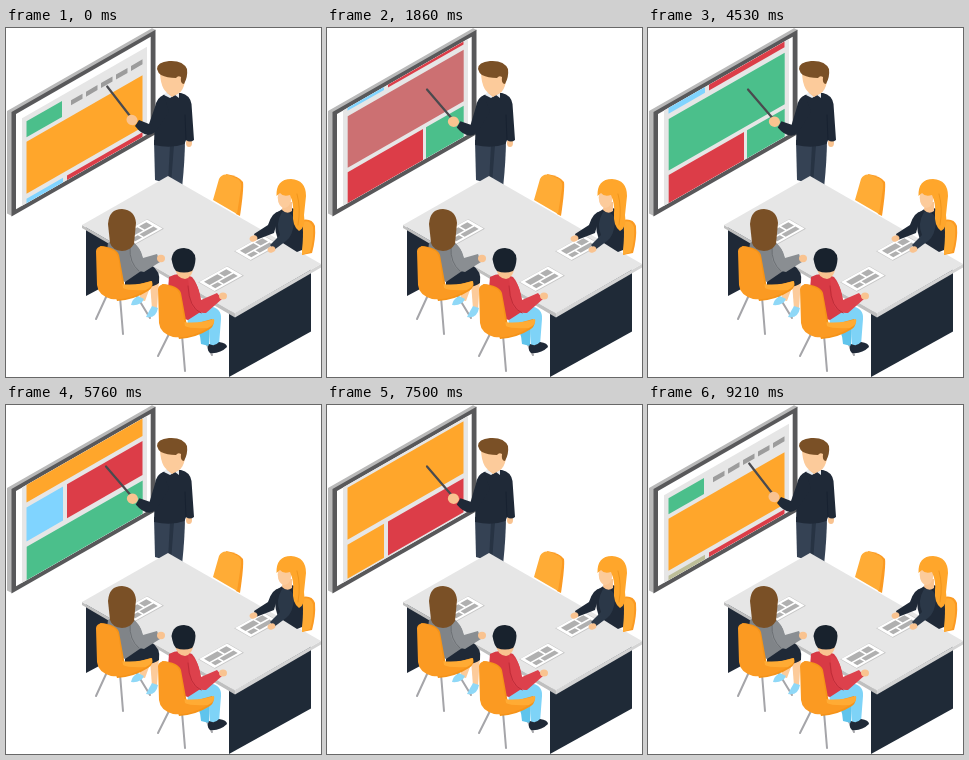
Recreate the animation shown at these times as an HTML page with a canvas. Size 315 by 349 pixels, loop 9.24 s.

```html
<!DOCTYPE html>
<html lang="en">
<head>
<meta charset="utf-8">
<title>Team presentation</title>
<style>
  html, body { margin: 0; width: 100%; height: 100%; overflow: hidden; background: #fff; }
  canvas { display: block; width: 315px; height: 349px; }
</style>
</head>
<body>
<canvas id="stage"></canvas>
<script>
const W = 315, H = 349, LOOP = 9240, SLOPE = 0.572;
const ORANGE = [255, 166, 43], BLUE = [128, 212, 255], CORAL = [240, 81, 84],
      GREEN = [75, 191, 139], GRAY = [155, 155, 155], RED = [220, 61, 72];
const NAVY = '#1f2937', SKIN = '#fccb9b', HAND = '#f9c390', HAIR = '#7a5026';
const CHAIR = '#fb9a22', CHAIR_LIGHT = '#ffab34', CHAIR_DARK = '#f59318';

const canvas = document.getElementById('stage');
const dpr = window.devicePixelRatio || 1;
canvas.width = W * dpr;
canvas.height = H * dpr;
const ctx = canvas.getContext('2d');

const rgb = c => `rgb(${c.map(Math.round)})`;
const mix = (a, b, k) => a.map((v, i) => v + (b[i] - v) * k);
const ramp = (t, a, b) => Math.min(1, Math.max(0, (t - a) / (b - a)));
const ease = k => (1 - Math.cos(Math.PI * k)) / 2;

function fill(color, d) {
  ctx.fillStyle = color;
  ctx.fill(new Path2D(d));
}

function line(color, width, d) {
  ctx.strokeStyle = color;
  ctx.lineWidth = width;
  ctx.stroke(new Path2D(d));
}

function oval(color, x, y, rx, ry, turn = 0) {
  ctx.fillStyle = color;
  ctx.beginPath();
  ctx.ellipse(x, y, rx, ry, turn, 0, Math.PI * 2);
  ctx.fill();
}

function block(color, x0, x1, y0, y1) {
  ctx.fillStyle = color;
  ctx.fillRect(x0, y0, x1 - x0, y1 - y0);
}

function scrollAt(t) {
  return 135 * ease(ramp(t, 0, 2330))
       - 104 * ease(ramp(t, 3590, 7260))
       - 31 * ease(ramp(t, 7480, 9200));
}

function drawPage(t) {
  const big = mix(mix(GRAY, CORAL, ramp(t, 1400, 2200)), GREEN, ramp(t, 2900, 3600));
  const small = mix(mix(BLUE, ORANGE, ramp(t, 6500, 7200)), BLUE, ramp(t, 9180, 9240));
  block('#e6e6e6', 16, 141, 88, 303);
  block(rgb(GREEN), 20.5, 56, 93.5, 109.5);
  for (let i = 0; i < 5; i++) block('#9c9c9c', 65 + i * 15, 76.5 + i * 15, 98, 103);
  block(rgb(ORANGE), 20.5, 136.5, 114, 166);
  block(rgb(small), 20.5, 57, 171, 205);
  block(rgb(RED), 61, 136.5, 171, 205);
  block(rgb(big), 20.7, 136.7, 210.5, 262);
  block(rgb(RED), 20.7, 96, 266.5, 299);
  block(rgb(GREEN), 99, 136.7, 266.5, 299);
}

function drawBoard(t) {
  fill('#b9b9b9', 'M1 83 L146 .3 L150 2 L6 86 V188 L1 185.5Z');
  ctx.save();
  // y is measured along the left edge of the page, x = 20
  ctx.transform(1, -SLOPE, 0, 1, 0, SLOPE * 20);
  block('#58585a', 5.5, 149.5, 75.8, 180.3);
  block('#fff', 10, 144.7, 80.2, 175.5);
  ctx.beginPath();
  ctx.rect(16, 80.2, 125, 95.3);
  ctx.clip();
  ctx.translate(0, -scrollAt(t));
  drawPage(t);
  ctx.restore();
}

function drawSpeaker(t) {
  fill('#354254', 'M148 112 L179 110 Q179 132 176 160 L149 152Z');
  fill('#273343', 'M164 117 L168 117 L165 156 L162 155Z');
  oval(HAND, 183, 115, 3, 4);
  fill(NAVY, 'M157 67 Q165 64 175 65 Q184 67 185.5 76 L188 112 Q184 115 180 112 L178.5 116 Q165 121 148 117 L149 84Z');
  line('#172130', 1, 'M179 87 L180 112');
  fill('#e8ecf0', 'M158 67 L161 63 L173 64 L173 70 L169 67 L164 70Z');
  fill(HAND, 'M160 57 H173 V65 L166 69 L161 65Z');
  fill(SKIN, 'M154 45 Q167 42 179 46 Q180 66 167 67 Q155 66 154 45Z');
  fill(HAIR, 'M151 41 Q151 34 163 33 Q177 32 181 41 Q182 49 178 56 Q174 56 175 49 Q172 47 170 50 Q161 50 155 47 Q152 45 151 41Z');

  ctx.save();
  ctx.translate(160, 84);
  ctx.rotate(-0.05 * (ease(ramp(t, 0, 1500)) - ease(ramp(t, 7400, LOOP))));
  ctx.translate(-160, -84);
  line('#4a4a4e', 2.2, 'M101.2 58.5 L124 88');
  fill(NAVY, 'M158 67 Q151 69 149 79 L143 96 L133 92 L129 98 Q135 106 142 107 Q149 106 152 100 L163 84Z');
  oval(HAND, 126, 92, 5.6, 5.2, 0.4);
  ctx.restore();
}

// flat sheet lying on the table, given by its left corner
function paper(x, y) {
  ctx.save();
  ctx.transform(28, -15.5, 15.5, 9, x, y);
  block('#c6c6c6', -0.02, 1.02, -0.02, 1.06);
  block('#fff', 0, 1, 0, 1);
  block('#b0b0b0', 0.1, 0.58, 0.14, 0.5);
  block('#b0b0b0', 0.64, 0.9, 0.14, 0.5);
  block('#b0b0b0', 0.1, 0.34, 0.6, 0.87);
  block('#b0b0b0', 0.4, 0.9, 0.6, 0.87);
  ctx.restore();
}

function drawTable() {
  fill(NAVY, 'M80 199 L127 225 V243 L80 268Z');
  fill('#1f2a37', 'M223 284 L305 239 V303.5 L223 349Z');
  fill('#bfbfbf', 'M76 197 L229 285 V289.5 L76 200Z');
  fill('#d4d4d4', 'M229 285 L315 236 V239.5 L229 289.5Z');
  fill('#e6e6e6', 'M76 197 L162 148 L315 236 L229 285.5Z');
  paper(113, 207);
  paper(229, 223);
  paper(193, 254);
}

function drawBackChair() {
  fill(CHAIR, 'M220 146 Q233 148 237 154 Q238 161 234 188 L230 186Z');
  fill('#ffac36', 'M213 151 Q216 145 223 147 L232 151 Q236 154 235 160 L231 186 L207 172Z');
}

function drawRightWoman() {
  fill(CHAIR, 'M296 192 Q306 190 309 198 Q310 211 306 225 L296 227Z');
  fill(CHAIR_LIGHT, 'M296 194 Q304 191 307 199 Q308 212 304 224 L296 227Z');
  fill(NAVY, 'M274 183 Q266 184 262 197 L248 206 L250 212 L268 205Z');
  oval(HAND, 247.5, 210.5, 4, 3, -0.4);
  fill(NAVY, 'M272 184 Q281 176 293 183 Q299 195 296 222 L291 224 L272 212 Q266 195 272 184Z');
  fill('#2b3848', 'M276 184 Q288 183 288 194 Q287 208 280 213 L268 222 L264 217 L274 207 Q269 196 276 184Z');
  oval(HAND, 265.5, 221.5, 4, 3, -0.4);
  fill(HAND, 'M277 174 H286 V183 Q281 187 276 182Z');
  oval(SKIN, 278.5, 169.5, 6.8, 10.5);
  fill('#ffa62b', 'M270.5 168 Q270 151 285 151 Q300 152 300 168 L298 187 Q300 199 293 203 Q286 198 287 185 Q288 176 284 167 Q277 169 274 165Z');
  line('#f0951c', 1, 'M291 166 Q295 180 292 197');
}

function drawLeftWoman() {
  line('#a5a5a9', 2, 'M101 267 L90 291 M114 269 L117 306 M130 267 L144 290');
  fill(SKIN, 'M136 257 L146 254 L139 273 L133 272Z');
  fill(SKIN, 'M144 255 L153 252 L151 281 L146 281Z');
  fill('#8fd8f7', 'M132 268 L138 271 Q135 278 125 277 Q126 271 132 268Z');
  fill('#8fd8f7', 'M146 278 L152 280 Q150 291 140 289 Q143 283 146 278Z');
  fill(NAVY, 'M119 245 L145 237 Q155 243 153 255 Q145 261 119 261Z');
  fill('#808488', 'M102 215 Q112 209 127 214 Q137 221 138 241 L119 254 L98 245Z');
  fill('#8a8e92', 'M125 215 Q134 217 137 230 L151 226 L154 234 L138 244 Q127 243 124 231Z');
  line('#6c7074', 1, 'M124 219 Q123 235 133 243');
  oval(HAND, 155, 230.5, 4, 3.7);
  fill(HAIR, 'M102 196 Q103 181 116 181 Q129 182 130 195 L128 216 Q124 223 116 223 Q106 222 104 215Z');
  fill(CHAIR_DARK, 'M94 218 Q110 219 113 227 L119 260 L145 253 Q149 258 142 263 Q128 272 111 273Z');
  fill(CHAIR_LIGHT, 'M115 256 Q130 258 146 253 Q148 258 140 262 Q128 267 114 266Z');
  fill(CHAIR, 'M90 223 Q91 217 99 219 L108 223 Q112 226 113 233 L117 260 Q122 263 140 262 Q122 273 105 271 Q92 267 91 257Z');
}

function drawBoy() {
  line('#a5a5a9', 2, 'M164 304 L152 328 M176 307 L179 343 M195 304 L206 327');
  fill('#5fc4ec', 'M186 285 L205 280 L203 318 L195 316 Q194 300 186 296Z');
  fill('#7ed3f7', 'M181 284 L203 278 Q216 280 215 291 L213 317 L204 317 L203 298 L182 298Z');
  fill(NAVY, 'M203 316 Q209 319 213 314 Q221 315 221 319 Q214 326 204 325 Q200 322 203 316Z');
  fill('#d83a45', 'M163 249 Q173 243 186 249 Q194 258 196 283 L182 292 L160 286Z');
  fill('#dd414c', 'M182 250 Q192 252 195 272 L211 265 L216 271 L200 285 Q189 286 185 276Z');
  line('#bf2c38', 1, 'M182 258 Q183 280 195 285');
  oval(HAND, 217, 268, 4, 3.6);
  fill(HAND, 'M169 239 H187 Q187 249 179 251 Q170 250 169 239Z');
  fill('#18222d', 'M165.5 231 Q167 220 178 220 Q189 221 189.5 231 Q189 239 186 243 Q178 246 170 243 Q167 240 165.5 231Z');
  fill(CHAIR_DARK, 'M156 256 Q172 257 175 265 L181 298 L206 291 Q210 296 204 301 Q190 310 173 311Z');
  fill(CHAIR_LIGHT, 'M177 294 Q192 296 208 291 Q210 296 202 300 Q190 305 176 304Z');
  fill(CHAIR, 'M152 261 Q153 255 161 257 L170 261 Q174 264 175 271 L179 298 Q184 301 202 300 Q184 311 167 309 Q154 305 153 295Z');
}

function draw(t) {
  ctx.setTransform(dpr, 0, 0, dpr, 0, 0);
  ctx.lineCap = 'round';
  block('#fff', 0, W, 0, H);
  drawBoard(t);
  drawSpeaker(t);
  drawBackChair();
  drawTable();
  drawRightWoman();
  drawLeftWoman();
  drawBoy();
}

const start = performance.now();
function tick() {
  draw((performance.now() - start) % LOOP);
  requestAnimationFrame(tick);
}
tick();
</script>
</body>
</html>
```
